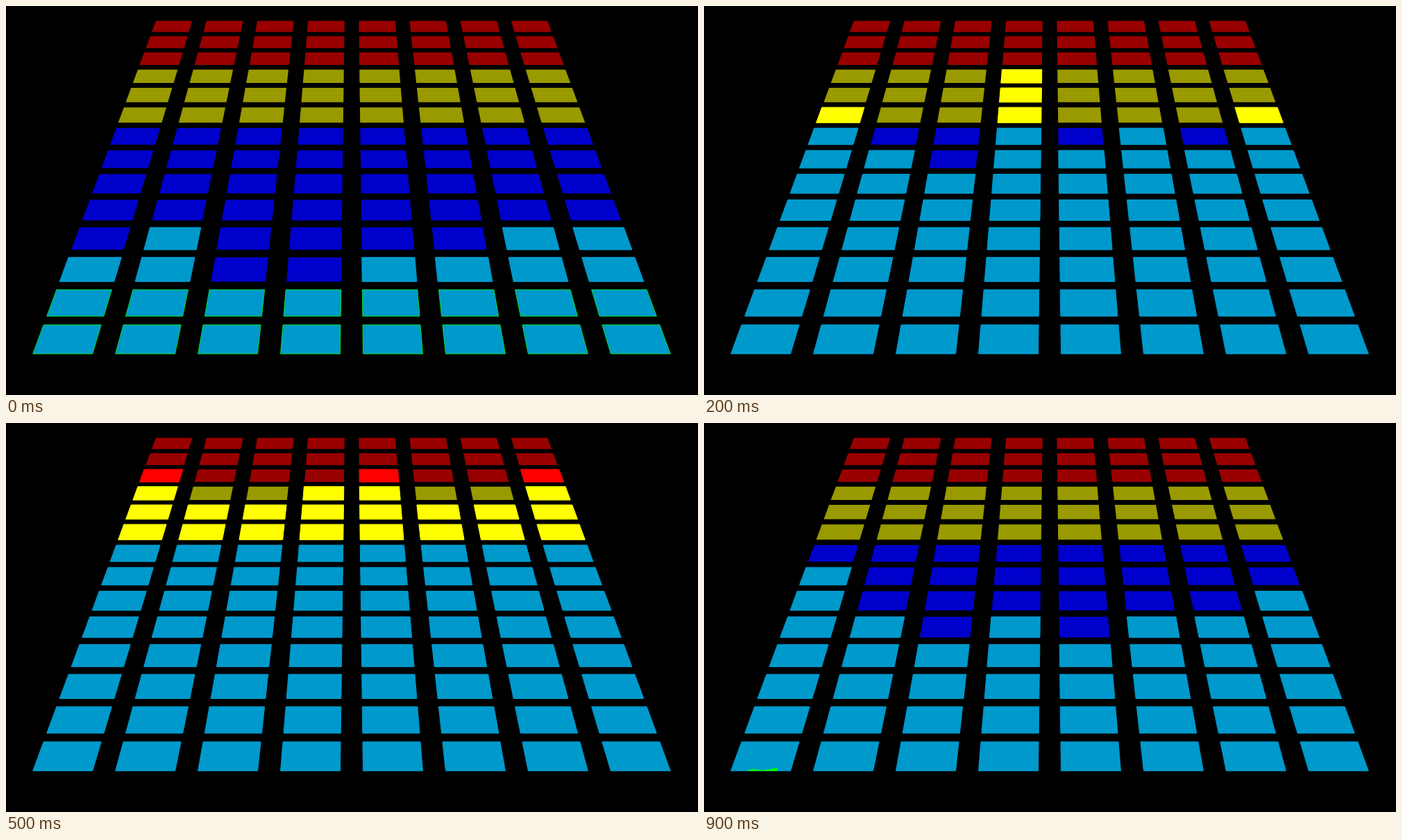
Animation of 997x561 px, one loop 1100 ms. Source, as an HTML page:

```html
<!DOCTYPE html>
<html lang="en">
<head>
<meta charset="utf-8">
<title>Equalizer</title>
<style>
  html, body { margin: 0; width: 100%; height: 100%; overflow: hidden; background: #000; }
  svg { display: block; width: 997px; height: 561px; }
</style>
</head>
<body>
<svg id="stage" viewBox="0 0 997 561"></svg>
<script>
const NS = 'http://www.w3.org/2000/svg';
const stage = document.getElementById('stage');
const COLS = 8, ROWS = 14, LOOP = 1100;

// Perspective floor: all column edges meet at the vanishing point.
const VX = 498, VY = -744.6, BASE = 502.2;
const NEAR = 1 / (BASE - VY), STEP = 3.6587e-5;
const INSET = 0.5; // half of the rim that lit cells carry
const depthY = row => VY + 1 / (NEAR + row * STEP);
const edgeX = (x, y) => VX + x * (y - VY) / (BASE - VY);

// Lit cells per column, from rest to peak.
const rest = [3, 4, 2, 2, 3, 3, 4, 4];
const low  = [7, 5, 4, 5, 4, 5, 5, 6];
const mid  = [9, 7, 6, 11, 7, 8, 7, 9];
const high = [12, 10, 10, 11, 12, 10, 10, 12];
const peak = [14, 12, 12, 13, 14, 12, 12, 14];
const steps = [[0, rest], [100, low], [200, mid], [300, high],
               [400, peak], [500, high], [700, mid], [900, low]];

const zones = [
  { end: 8,  off: '#0000cc', on: '#0099cc' },
  { end: 11, off: '#999900', on: '#ffff00' },
  { end: 14, off: '#990000', on: '#ff0000' }
];

function add(tag, attrs) {
  const el = document.createElementNS(NS, tag);
  for (const name in attrs) el.setAttribute(name, attrs[name]);
  return stage.appendChild(el);
}

function cellPoints(row, col) {
  const bottom = depthY(row) - INSET, top = depthY(row + 0.78) + INSET;
  const left = col * 119 - 460, right = left + 87;
  return [
    [edgeX(left, top) + INSET, top], [edgeX(right, top) - INSET, top],
    [edgeX(right, bottom) - INSET, bottom], [edgeX(left, bottom) + INSET, bottom]
  ].join(' ');
}

const cells = [];
for (let row = 0; row < ROWS; row++) {
  const zone = zones.find(z => row < z.end);
  for (let col = 0; col < COLS; col++) {
    cells.push({ row, col, zone, el: add('polygon', { points: cellPoints(row, col) }) });
  }
}

const spark = add('path', {
  d: 'M62 502 L66 499.5 74 499 79 500.5 86 501 91 499.5 98 499 102 497.5 106 498 106 502 Z',
  fill: '#00ff00'
});

function paint(levels) {
  for (const { row, col, zone, el } of cells) {
    const lit = row < levels[col];
    const rim = levels === rest && row < 2 ? '#00dc28' : zone.on;
    el.setAttribute('fill', lit ? zone.on : zone.off);
    el.setAttribute('stroke', lit ? rim : 'none');
  }
  spark.setAttribute('visibility', levels === low ? 'visible' : 'hidden');
}

let shown;
function frame(now) {
  const t = now % LOOP;
  const levels = steps.findLast(([start]) => t >= start)[1];
  if (levels !== shown) paint(shown = levels);
  requestAnimationFrame(frame);
}
paint(shown = rest);
requestAnimationFrame(frame);
</script>
</body>
</html>
```
